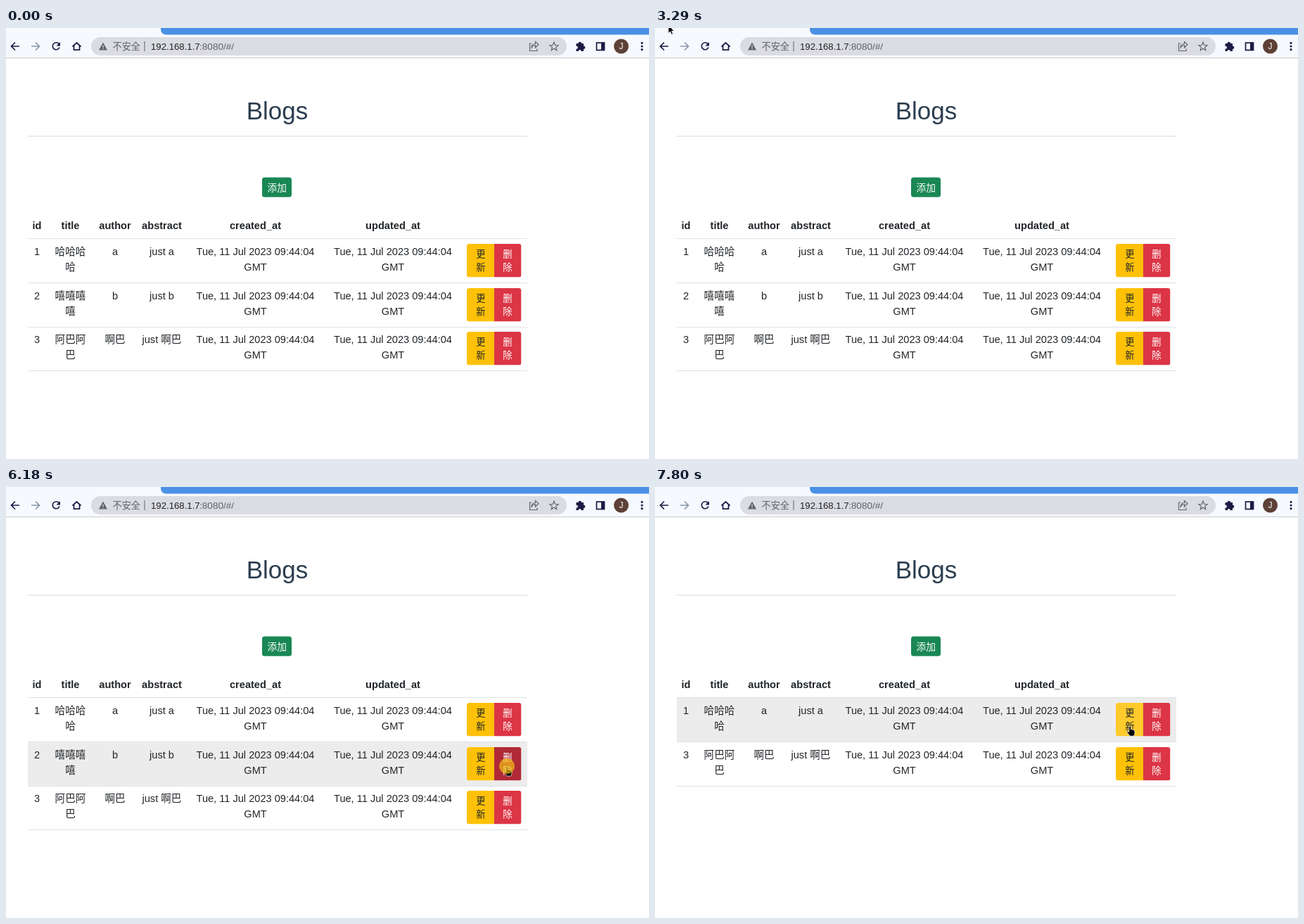
An HTML page that plays this animation: 914x613 px, repeating every 8000 ms.

```html
<!DOCTYPE html>
<html lang="zh-CN">
<head>
<meta charset="utf-8">
<style>
html, body { margin: 0; width: 100%; height: 100%; overflow: hidden; background: #fff; }
svg { display: block; font: 14.6px "Liberation Sans", Arial, "Noto Sans CJK SC", "Noto Sans CJK", sans-serif; }
.mid { text-anchor: middle; fill: #212529; }
.icon { fill: none; stroke: #1b1b45; stroke-width: 1.7; }
.thin { fill: none; stroke: #5f6368; stroke-width: 1.2; }
.small { font-size: 13.3px; }
.edit { clip-path: inset(0 round 3.5px 0 0 3.5px); }
.del { clip-path: inset(0 round 0 3.5px 3.5px 0); }
</style>
</head>
<body>
<svg width="914" height="613" viewBox="0 0 914 613">
  <!-- browser bar -->
  <rect width="914" height="42" fill="#f6f9fe"/>
  <path fill="#4a90e5" d="M220 0H914V9.5H228Q220 9.5 220 1Z"/>
  <rect y="42" width="914" height="1" fill="#c9cbd1"/>
  <rect x="121" y="13" width="676" height="26" rx="13" fill="#dbdce1"/>
  <path class="icon" d="M19 26H8m5-5.5L7.5 26l5.500 5.500"/>
  <path class="icon" style="stroke:#8b95a8" d="M36 26H47m-5-5.500L47.500 26l-5.500 5.500"/>
  <path class="icon" d="M75.500 23A5 5 0 1 0 76 27.500"/>
  <path fill="#1b1b45" d="M77 20v5.500h-5.500Z"/>
  <path class="icon" d="M94.500 26.500l6-5.500l6 5.500m-10-1v5.700h8v-5.700"/>
  <path fill="#5f6368" d="M138 20.500l6 11h-12Z"/>
  <path stroke="#dbdce1" stroke-width="1.300" d="M138 24.500V28m0 1v1.300"/>
  <g fill="#5f6368" style="font-size:13.2px">
    <text x="151.500" y="31">不安全</text>
    <rect x="196.500" y="19" width="1" height="14"/>
    <text x="206" y="31" fill="#202124">192.168.1.7</text>
    <text x="275" y="31" style="font-size:13.6px">:8080/#/</text>
  </g>
  <path class="thin" d="M747 22h-2.500v10.500H755v-3M747 29q1-4.500 5.500-4.500V28l4.500-4.500l-4.500-4v3Q747 22.500 747 29Z"/>
  <path class="thin" id="star"/>
  <g fill="#1b1b45">
    <rect x="810.500" y="22" width="10.500" height="11"/>
    <circle cx="815.800" cy="22" r="2.300"/>
    <circle cx="821" cy="27.700" r="2.300"/>
  </g>
  <g fill="#f6f9fe"><circle cx="811" cy="27.700" r="2"/><circle cx="815.600" cy="33" r="2"/></g>
  <rect class="icon" x="839.500" y="21" width="11" height="10.500"/>
  <rect x="846" y="20.500" width="5" height="11.500" fill="#1b1b45"/>
  <circle cx="874.500" cy="26" r="10.500" fill="#5d4037"/>
  <text x="874.500" y="30.300" class="mid" style="font-size:12px;fill:#fff">J</text>
  <path stroke="#1b1b45" stroke-width="3.200" stroke-linecap="round" stroke-dasharray="0 4.700" d="M904 21.300V31"/>

  <!-- page -->
  <text x="385.500" y="130" class="mid" style="font-size:35px;fill:#2c3e50">Blogs</text>
  <rect x="31" y="153.500" width="710" height="1" fill="#d5d7d9"/>
  <rect x="364" y="212.500" width="42" height="28" rx="3.500" fill="#198754"/>
  <text x="385.300" y="231.800" class="mid" style="font-size:13.700px;fill:#fff">添加</text>
  <g id="head" font-weight="bold"></g>
  <rect x="31" y="299" width="710" height="1" fill="#dee2e6"/>
  <g id="table"></g>

  <g id="pointer" stroke="#fff" stroke-width=".7">
    <path id="arrow" d="M0 0V11.500L2.700 9l1.800 4.200l2-.9l-1.800-4h3.500Z"/>
    <path id="hand" d="M-1.200 1Q0-1 1.400 1v3.500l4.100 1.100Q7 6 7 8v2q0 2-1.500 4.200H0L-3.800 9q-.7-2.200 1-1.800l1.600 1.600Z"/>
  </g>
  <circle id="click" cx="712" cy="397" r="11" fill="#f5c211" fill-opacity=".68"/>
</svg>
<script>
const $ = id => document.getElementById(id);
const LOOP = 8000, STEP = 67, PRESS = 6180, RELEASE = 6240, REMOVED = 6450;
const columns = [44, 91.5, 155, 221.5, 354.5, 550];
const slots = [300, 363, 425, 488];
const date = 'Tue, 11 Jul 2023 09:44:04|GMT';
const data = [
  ['1', '哈哈哈|哈', 'a', 'just a', date, date],
  ['2', '嘻嘻嘻|嘻', 'b', 'just b', date, date],
  ['3', '阿巴阿|巴', '啊巴', 'just 啊巴', date, date]
];

// Pointer moves: first step, last step, number of steps, points evenly spaced in time
const moves = [
  [650, 1070, 7, '843,440 833,387'],
  [1470, 1540, 2, '822,377'],
  [1870, 2280, 7, '755,295 650,185 478.5,121'],
  [2350, 2630, 5, '240,98 131,53'],
  [2700, 2830, 3, '100,35 60,14 69,21'],
  [3220, 3290, 2, '19,-4'],
  [3620, 3820, 3, '68,29'],
  [4020, 4690, 11, '205,80 550,232 735,303.5'],
  [4760, 4760, 1, '735,326'],
  [4830, 5040, 4, '746,345 743.5,356'],
  [5110, 5450, 6, '712,397'],
  [6910, 6990, 2, '674,365'],
  [7050, 7660, 9, '672,352 674,343'],
  [7730, 7800, 2, '675,340']
];
let last = [858, 610];
for (const move of moves) {
  move[3] = [last, ...move[3].split(' ').map(p => p.split(',').map(Number))];
  last = move[3].at(-1);
}

const text = (x, y, s, extra = 'class="mid"') => `<text x="${x}" y="${y}" ${extra}>${s}</text>`;
const lines = (x, y, gap, s, extra) => s.split('|').map((part, i) => text(x, y + i * gap, part, extra)).join('');

$('star').setAttribute('d', 'M' + Array.from({ length: 10 }, (_, i) => {
  const r = i % 2 ? 2.8 : 6.4, a = i * Math.PI / 5;
  return [779 + r * Math.sin(a), 26.5 - r * Math.cos(a)];
}).join('L') + 'Z');

$('head').innerHTML = ['id', 'title', 'author', 'abstract', 'created_at', 'updated_at']
  .map((s, i) => text(columns[i], 286, s)).join('');

$('table').innerHTML = data.map(cells => `<g>
  <rect class="back" x="31" width="710" height="62" fill="#ececec"/>
  <rect x="31" y="62" width="710" height="1" fill="#dee2e6"/>
  ${cells.map((s, i) => lines(columns[i], 23, 22, s)).join('')}
  <rect class="edit" x="655" y="7" width="39" height="47.5"/>
  <rect class="del" x="694" y="7" width="38.5" height="47.5"/>
  ${lines(675, 25.8, 19, '更|新', 'class="mid small"')}
  ${lines(713, 25.8, 19, '删|除', 'class="mid small" style="fill:#fff"')}
</g>`).join('');

const rows = [...$('table').children].map(g => ({
  g, back: g.querySelector('.back'), edit: g.querySelector('.edit'), del: g.querySelector('.del')
}));

function pointerAt(t) {
  const move = moves.findLast(m => t >= m[0]);
  if (!move) return null;
  const [from, to, count, points] = move;
  const step = Math.min(count, Math.floor((t - from) / (to - from || 1) * (count - 1) + .15) + 1);
  const u = step / count * (points.length - 1);
  const i = Math.min(points.length - 2, Math.floor(u));
  return points[i].map((v, axis) => v + (points[i + 1][axis] - v) * (u - i));
}

const show = (el, on) => el.setAttribute('visibility', on ? 'visible' : 'hidden');
const within = (v, low, high) => v >= low && v < high;

function draw(t) {
  const spot = pointerAt(t), [x, y] = spot || [-99, -99];
  // Row shading follows the pointer one step late
  const [lateX, lateY] = pointerAt(t - STEP) || [-99, -99];
  const pressed = t >= PRESS && t < RELEASE;
  let onButton = false;
  rows.forEach((row, i) => {
    const gone = t >= REMOVED && i === 1;
    row.g.style.display = gone ? 'none' : '';
    if (gone) return;
    const slot = t >= REMOVED && i === 2 ? 1 : i, top = slots[slot];
    row.g.setAttribute('transform', `translate(0 ${top})`);
    show(row.back, within(lateX, 31, 741) && within(lateY, top, slots[slot + 1]));
    const level = within(y, top + 7, top + 55);
    const onEdit = level && within(x, 655, 694), onDelete = level && within(x, 694, 733);
    row.edit.setAttribute('fill', onEdit ? '#ffca2c' : '#ffc107');
    row.del.setAttribute('fill', !onDelete ? '#dc3545' : pressed ? '#b02a37' : '#bb2d3b');
    onButton ||= onEdit || onDelete;
  });
  $('pointer').setAttribute('transform', `translate(${x} ${y})`);
  show($('arrow'), spot && !onButton);
  show($('hand'), spot && onButton);
  show($('click'), pressed);
}

const start = performance.now();
function tick() {
  draw((performance.now() - start) % LOOP);
  requestAnimationFrame(tick);
}
tick();
</script>
</body>
</html>
```
